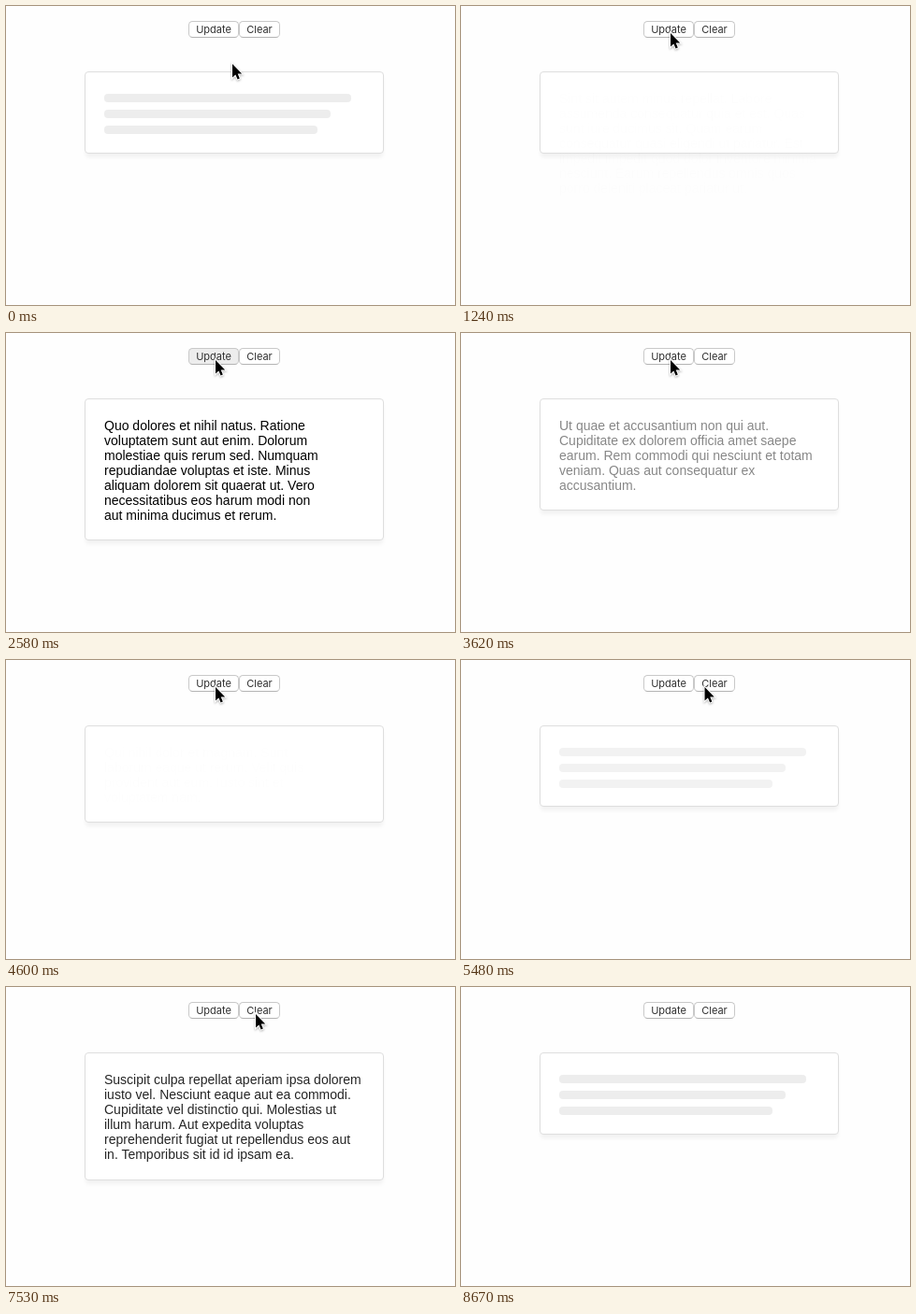
Recreate the animation shown at these times as an HTML page. Size 480 by 320 pixels, loop 9370 ms.

```html
<!DOCTYPE html>
<html lang="la">
<head>
<meta charset="utf-8">
<style>
html, body { margin: 0; width: 100%; height: 100%; overflow: hidden; background: #fefefe; }
#stage { position: relative; width: 480px; height: 320px; overflow: hidden; }
#stage * { position: absolute; box-sizing: border-box; }
.btn {
  top: 16px; height: 18px; border: 1px solid #c9c9c9; border-bottom-color: #b4b4b4;
  border-radius: 4.5px; background: #fff; color: #303030;
  font: 11px/16px Inter, sans-serif; text-align: center;
}
.btn.down { background: #ededed; }
#card {
  left: 84px; top: 70px; width: 320px; border: 1px solid #dedede; border-radius: 4px;
  background: #fff; box-shadow: 0 5px 4px -1px rgba(0, 0, 0, .05);
}
#text {
  left: 20px; top: 20px; white-space: pre; color: #000;
  font: 14px/16px "Liberation Sans", Arial, sans-serif;
}
#bars i { left: 20px; height: 9px; border-radius: 4px; background: #ededed; }
#cursor { left: 0; top: 0; overflow: visible; filter: drop-shadow(0 1px 1px rgba(0, 0, 0, .3)); }
</style>
</head>
<body>
<div id="stage">
  <div class="btn" id="update" style="left:195px;width:54px">Update</div>
  <div class="btn" id="clear" style="left:249px;width:44px">Clear</div>
  <div id="card">
    <div id="bars">
      <i style="top:23px;width:264px"></i>
      <i style="top:40px;width:242px"></i>
      <i style="top:57px;width:228px"></i>
    </div>
    <div id="text"></div>
  </div>
  <svg id="cursor" width="14" height="20">
    <path d="M0 0V14.6L3.4 11.4L5.6 16.4L7.8 15.4L5.7 10.6H10.2Z" stroke="#fff" stroke-width="2" paint-order="stroke"/>
  </svg>
</div>
<script>
const LOOP = 9370, FADE = 300;
const $ = id => document.getElementById(id);

// Each click: press time, release time, new text (empty = placeholder).
const clicks = [
  [-2000, -1900, ""],
  [760, 1240, `Sint sit autem minus repellat. Labore
assumenda consequatur quia et est. Quas
sunt iure ducimus sit. Quam earum
consequatur quasi eligendi ut pariatur. Est
impedit impedit quod dolor inventore minima
nesciunt. Earum repellendus omnis quos
porro deleniti placeat pariatur ut.`],
  [2040, 2120, `Quo dolores et nihil natus. Ratione
voluptatem sunt aut enim. Dolorum
molestiae quis rerum sed. Numquam
repudiandae voluptas et iste. Minus
aliquam dolorem sit quaerat ut. Vero
necessitatibus eos harum modi non
aut minima ducimus et rerum.`],
  [2580, 2640, `Et rerum nobis quia dolorem. Autem
voluptatibus sit eum quos. Tempora
similique aut nihil vel eveniet. Non et
molestias quo illo. Ipsum ut
consectetur.`],
  [3220, 3480, `Ut quae et accusantium non qui aut.
Cupiditate ex dolorem officia amet saepe
earum. Rem commodi qui nesciunt et totam
veniam. Quas aut consequatur ex
accusantium.`],
  [3960, 4030, `Aut enim voluptas sed quia. Nemo
dolores et facilis non itaque. Omnis
quaerat ut minus sit. Eos rerum
perferendis et illum.`],
  [4540, 4600, `Qui nihil dolor et magnam. Sunt
laborum eaque ut rerum. Velit quis
provident aut eum. Iusto sint et
voluptatem nam.`],
  [5200, 5270, ""],
  [5780, 5850, `Sed ea sed sint minima. Asperiores sit hic
officia sunt repudiandae nobis sint corporis.
Explicabo excepturi est quia quia qui. Vel
eius explicabo qui sit. Facere sapiente nemo
non temporibus unde cumque modi culpa.`],
  [6530, 6600, ""],
  [7200, 7275, `Suscipit culpa repellat aperiam ipsa dolorem
iusto vel. Nesciunt eaque aut ea commodi.
Cupiditate vel distinctio qui. Molestias ut
illum harum. Aut expedita voluptas
reprehenderit fugiat ut repellendus eos aut
in. Temporibus sit id id ipsam ea.`],
  [8050, 8120, ""]
].map(([press, start, text]) =>
  ({ press, start, text, height: 40 + 16 * (text ? text.split("\n").length : 3) }));

// Cursor tip: time, x, y
const path = [
  [0, 242, 62], [290, 242, 62], [590, 224, 29],
  [5000, 224, 29], [5180, 265, 29], [5440, 265, 29], [5640, 224, 29],
  [5980, 224, 29], [6200, 265, 28], [6720, 265, 28], [6960, 224, 29],
  [7290, 224, 29], [7510, 267, 29], [8300, 267, 29], [8670, 242, 62], [LOOP, 242, 62]
];

function tip(t) {
  const i = path.findIndex(k => k[0] > t);
  const [t0, x0, y0] = path[i - 1], [t1, x1, y1] = path[i];
  const u = (t - t0) / (t1 - t0), e = u * u * (3 - 2 * u);
  return [x0 + (x1 - x0) * e, y0 + (y1 - y0) * e];
}

// Underdamped spring from 0 to 1, about 9% overshoot
function spring(ms) {
  const s = ms / 1000, w = 18, a = 13.5;
  return 1 - Math.exp(-a * s) * (Math.cos(w * s) + a / w * Math.sin(w * s));
}

function draw(t) {
  const n = clicks.findLastIndex(c => c.start <= t);
  const now = clicks[n], prev = clicks[n - 1] || now, next = clicks[n + 1];
  const age = t - now.start, fade = Math.min(1, age / FADE);

  $("card").style.height = prev.height + (now.height - prev.height) * spring(age) + "px";
  if ($("text").textContent !== now.text) $("text").textContent = now.text;
  $("text").style.opacity = fade;
  $("bars").style.opacity = now.text ? 0 : fade;

  const down = next && t >= next.press;
  $("update").classList.toggle("down", !!(down && next.text));
  $("clear").classList.toggle("down", !!(down && !next.text));

  const [x, y] = tip(t);
  $("cursor").style.transform = `translate(${x}px, ${y}px)`;
  $("cursor").style.visibility = t < 8670 ? "visible" : "hidden";
}

function tick() {
  draw(performance.now() % LOOP);
  requestAnimationFrame(tick);
}
tick();
</script>
</body>
</html>
```
